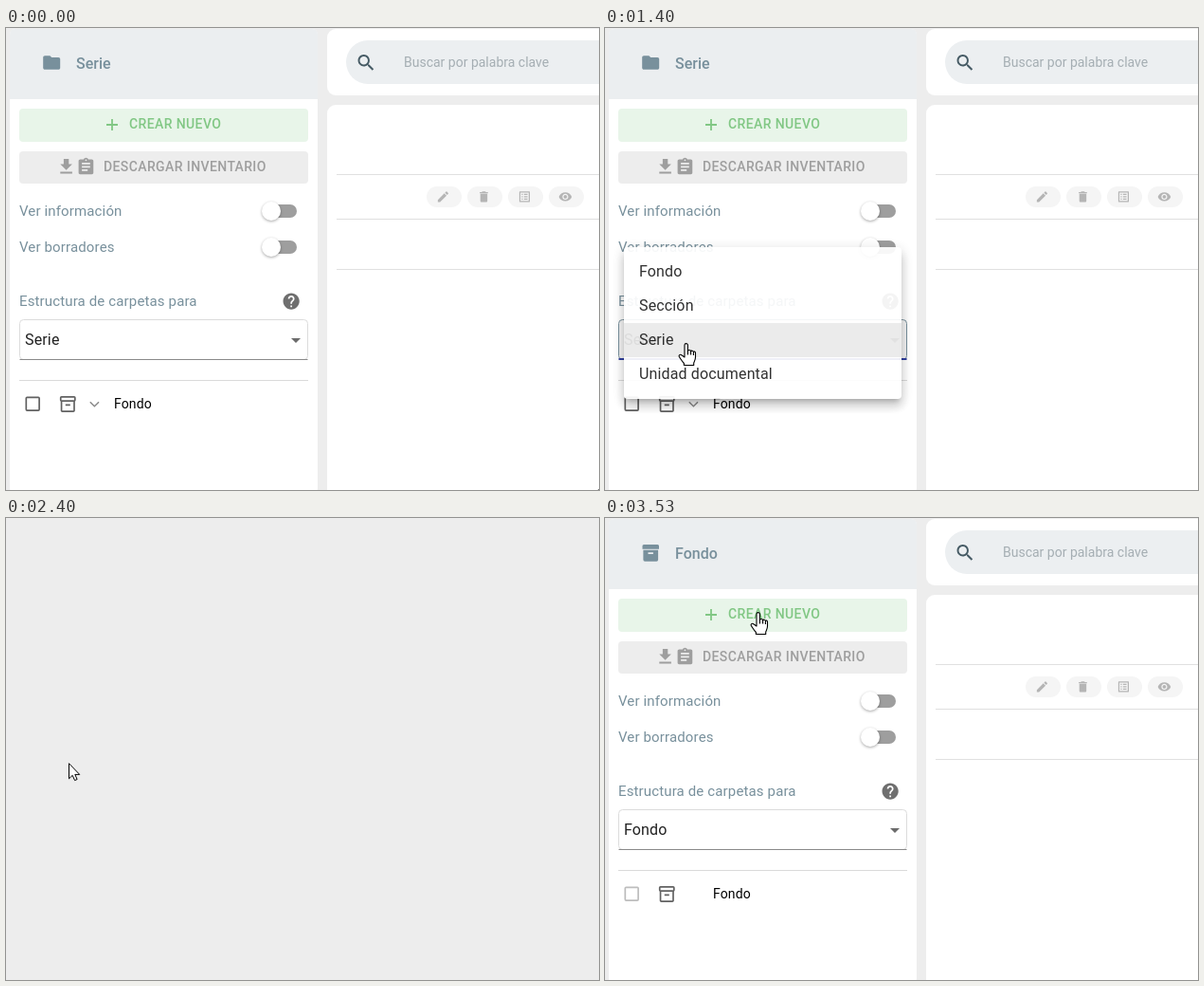
Animation of 626 by 487 pixels, one loop 6.47 s. Source, as an HTML page:

```html
<!DOCTYPE html>
<html lang="es">
<head>
<meta charset="utf-8">
<title>Estructura de carpetas</title>
<style>
  html, body { margin: 0; width: 100%; height: 100%; overflow: hidden; background: #ededed; }
  svg { position: absolute; left: 0; top: 0; }
  text, #menu { font-family: Roboto, sans-serif; }
  .slate { fill: #78909c; }
  .title { font-size: 16px; font-weight: 500; }
  .button { font-size: 14px; font-weight: 500; letter-spacing: .4px; }
  .label { font-size: 15px; letter-spacing: .14px; }
  .value { font-size: 16px; letter-spacing: .15px; fill: #212121; }
  .thumb { fill: #fff; filter: drop-shadow(0 1px 1.5px rgba(0,0,0,.35)); }
  #menu {
    position: absolute; left: 20px; top: 231px; width: 293px; padding: 8px 0;
    background: #fff; border-radius: 4px;
    box-shadow: 0 5px 5px -3px rgba(0,0,0,.2), 0 8px 10px 1px rgba(0,0,0,.14), 0 3px 14px 2px rgba(0,0,0,.12);
    font-size: 16px; letter-spacing: .15px; line-height: 36px; color: rgba(0,0,0,.87);
  }
  #menu div { height: 36px; padding-left: 16px; }
</style>
</head>
<body>
<svg id="page" width="626" height="487">
  <defs>
    <g id="switch">
      <rect x="273" y="-7" width="34" height="14" rx="7" fill="#9e9e9e"/>
      <circle class="thumb" cx="280" r="10"/>
    </g>
    <rect id="pill" y="167" width="37" height="22" rx="11" fill="#f5f5f5"/>
  </defs>

  <!-- Side panel -->
  <rect x="4" y="1" width="325" height="490" rx="6" fill="#fff"/>
  <path d="M4 75V7q0-6 6-6H323q6 0 6 6V75z" fill="#ebeef0"/>
  <path id="folder" class="slate" transform="translate(37.4 25.7) scale(.9)" d="M10 4H4c-1.1 0-2 .9-2 2v12c0 1.1.9 2 2 2h16c1.1 0 2-.9 2-2V8c0-1.1-.9-2-2-2h-8l-2-2z"/>
  <path id="box" class="slate" fill-rule="evenodd" d="M41 28H55.5q1.5 0 1.5 1.5V32.8H39.5V29.5q0-1.5 1.5-1.5zM40.4 33.8H56.1V44q0 1.7-1.7 1.7H42.1q-1.7 0-1.7-1.7zM45.5 36.3v1.7h5.4v-1.7z"/>
  <text id="title" class="title slate" x="74" y="42.5"></text>

  <rect x="14" y="85" width="305" height="35" rx="4" fill="#e8f5e9"/>
  <path d="M106 102h12M112 96v12" stroke="#81c784" stroke-width="1.8"/>
  <text class="button" x="130" y="106" fill="#81c784">CREAR NUEVO</text>

  <rect x="14" y="130" width="305" height="34" rx="4" fill="#ededed"/>
  <g fill="#9e9e9e">
    <path transform="translate(52.8 135.4) scale(.9)" d="M19 9h-4V3H9v6H5l7 7 7-7zM5 18v2h14v-2z"/>
    <path transform="translate(74 136) scale(.87)" d="M19 3h-4.18C14.4 1.84 13.3 1 12 1s-2.4.84-2.82 2H5c-1.1 0-2 .9-2 2v14c0 1.1.9 2 2 2h14c1.1 0 2-.9 2-2V5c0-1.1-.9-2-2-2zm-7 0c.55 0 1 .45 1 1s-.45 1-1 1-1-.45-1-1 .45-1 1-1zm2 14H7v-2h7v2zm3-4H7v-2h10v2zm0-4H7V7h10v2z"/>
    <text class="button" x="103" y="151">DESCARGAR INVENTARIO</text>
  </g>

  <text class="label slate" x="14" y="198">Ver información</text>
  <use href="#switch" y="193"/>
  <text class="label slate" x="14" y="236">Ver borradores</text>
  <use href="#switch" y="231"/>
  <text class="label slate" x="14" y="293">Estructura de carpetas para</text>
  <path transform="translate(290.8 277.8) scale(.86)" fill="#6f6f6f" d="M12 2C6.48 2 2 6.48 2 12s4.48 10 10 10 10-4.48 10-10S17.52 2 12 2zm1 17h-2v-2h2v2zm2.07-7.75l-.9.92C13.45 12.9 13 13.5 13 15h-2v-.5c0-1.1.45-2.1 1.17-2.83l1.24-1.26c.37-.36.59-.86.59-1.41 0-1.1-.9-2-2-2s-2 .9-2 2H8c0-2.21 1.79-4 4-4s4 1.79 4 4c0 .88-.36 1.68-.93 2.25z"/>

  <rect id="field" x="14.5" y="307.5" width="304" height="42" rx="4"/>
  <rect id="underline" x="14.5" width="304"/>
  <text id="value" class="value" x="20" y="334"></text>
  <path d="M301 327h10l-5 5z" fill="#6b6b6b"/>
  <path d="M14 371.5H319" stroke="#dadada"/>

  <g id="tree">
    <rect id="check" x="21.3" y="389.3" width="13.8" height="13.8" rx="1" fill="none" stroke-width="1.7"/>
    <path transform="translate(55.2 386.4) scale(.84)" fill="#616161" d="M20 2H4c-1 0-2 .9-2 2v3.01c0 .72.43 1.34 1 1.69V20c0 1.1 1.1 2 2 2h14c.9 0 2-.9 2-2V8.7c.57-.35 1-.97 1-1.69V4c0-1.1-1-2-2-2zm-1 18H5V9h14v11zm1-13H4V4h16v3zM9 12h6v2H9z"/>
    <path id="chevron" d="M88.8 394.2l4.6 4.6 4.6-4.6" fill="none" stroke="#8a8a8a" stroke-width="1.5"/>
    <text x="114" y="401" font-size="14" letter-spacing=".13">Fondo</text>
  </g>
  <g id="loader">
    <circle cx="150.5" cy="431.5"/><circle cx="161.5" cy="431.5"/>
    <circle cx="172.5" cy="431.5"/><circle cx="183.5" cy="431.5"/>
  </g>

  <!-- Search and table -->
  <rect x="339" y="1" width="310" height="70" rx="9" fill="#fff"/>
  <rect x="359" y="13" width="310" height="46" rx="23" fill="#eceff1"/>
  <path transform="translate(368.7 25.2) scale(.95)" fill="#455a64" d="M15.5 14h-.79l-.28-.27C15.41 12.59 16 11.11 16 9.5 16 5.91 13.09 3 9.5 3S3 5.91 3 9.5 5.91 16 9.5 16c1.61 0 3.09-.59 4.23-1.57l.27.28v.79l5 4.99L20.49 19l-4.99-5zm-6 0C7.01 14 5 11.99 5 9.5S7.01 5 9.5 5 14 7.01 14 9.5 11.99 14 9.5 14z"/>
  <text x="420" y="41" font-size="14" fill="#a5aeb3">Buscar por palabra clave</text>
  <rect x="339" y="81" width="310" height="430" rx="9" fill="#fff"/>
  <g id="table">
    <path d="M349 154.5H626M349 201.5H626M349 254.5H626" stroke="#e0e0e0"/>
    <use href="#pill" x="444"/><use href="#pill" x="487"/><use href="#pill" x="530"/><use href="#pill" x="573"/>
    <g fill="#b5b5b5">
      <path transform="translate(454 170.5) scale(.62)" d="M3 17.25V21h3.75L17.81 9.94l-3.75-3.75L3 17.25zM20.71 7.04c.39-.39.39-1.02 0-1.41l-2.34-2.34c-.39-.39-1.02-.39-1.41 0l-1.83 1.83 3.75 3.75 1.83-1.83z"/>
      <path transform="translate(497 170.5) scale(.62)" d="M6 19c0 1.1.9 2 2 2h8c1.1 0 2-.9 2-2V7H6v12zM19 4h-3.5l-1-1h-5l-1 1H5v2h14V4z"/>
      <path transform="translate(540 170.5) scale(.62)" d="M19 5v14H5V5h14m1.1-2H3.9c-.5 0-.9.4-.9.9v16.2c0 .4.4.9.9.9h16.2c.4 0 .9-.5.9-.9V3.9c0-.5-.5-.9-.9-.9zM11 7h6v2h-6zm0 4h6v2h-6zm0 4h6v2h-6zM7 7h2v2H7zm0 4h2v2H7zm0 4h2v2H7z"/>
      <path transform="translate(583 170.5) scale(.62)" d="M12 4.5C7 4.5 2.73 7.61 1 12c1.73 4.39 6 7.5 11 7.5s9.27-3.11 11-7.5c-1.73-4.39-6-7.5-11-7.5zM12 17c-2.76 0-5-2.24-5-5s2.24-5 5-5 5 2.24 5 5-2.24 5-5 5zm0-8c-1.66 0-3 1.34-3 3s1.34 3 3 3 3-1.34 3-3-1.34-3-3-3z"/>
    </g>
  </g>
</svg>

<div id="menu"><div>Fondo</div><div>Sección</div><div>Serie</div><div>Unidad documental</div></div>

<svg width="626" height="487">
  <g id="cursor" fill="#fff" stroke="#000" stroke-linejoin="round">
    <path id="arrow" stroke-linejoin="miter" d="M.5 .7V16.8l3.7-3.5 2.4 5.3 2.5-1.1-2.3-5.1h4.9z"/>
    <g id="hand" stroke-width="1.1">
      <path d="M-2 15V2.3a1.7 1.7 0 0 1 3.4 0V8.5c.5-1.6 3-1.2 3.2.4.6-1.3 2.6-.9 2.8.7.7-1 2-.6 2.1.9V15c0 3-1.2 4.5-1.8 6v2.5H-2.6V21.5C-4.5 19.5-6 17-7.6 14.6c-1-1.6.8-3 2.4-1.8z"/>
      <path d="M1.4 8.5v4M4.6 9v3.5M7.4 10v3" fill="none"/>
    </g>
  </g>
</svg>

<script>
const LOOP = 6470, FPS = 15;
const $ = id => document.getElementById(id);
const show = (id, on) => { $(id).style.display = on ? '' : 'none'; };
const set = (el, attrs) => { for (const name in attrs) el.setAttribute(name, attrs[name]); };
const clamp = v => Math.min(1, Math.max(0, v));
const smooth = v => { v = clamp(v); return v * v * (3 - 2 * v); };

// Pointer path: [tick, x, y]
const path = [
  [0, 625, 486], [2, 590, 478], [4, 488, 450], [6, 367, 416], [8, 262, 386], [10, 201, 367], [11, 190, 364],
  [12, 160, 354], [13, 120, 342], [14, 99, 335], [15, 92, 333], [17, 86, 332], [23, 86, 332],
  [28, 77, 302], [33, 67, 260], [35, 66, 258], [38, 66, 258], [40, 92, 238], [42, 142, 205],
  [45, 157, 150], [48, 162, 112], [53, 162, 99]
];
const OPEN = 19, BLANK = 36, RELOAD = 39, TREE = 45, ROWS = 50;

function pointer(tick) {
  const i = path.findIndex(p => p[0] > tick);
  if (i < 0) return path[path.length - 1].slice(1);
  const [t0, x0, y0] = path[i - 1], [t1, x1, y1] = path[i];
  const f = (tick - t0) / (t1 - t0);
  return [Math.round(x0 + (x1 - x0) * f), Math.round(y0 + (y1 - y0) * f)];
}

function draw(ms) {
  const tick = Math.floor((ms + 5) * FPS / 1000);
  const reloaded = tick >= RELOAD, open = tick >= OPEN && tick < BLANK;
  const [x, y] = pointer(tick);

  show('page', tick < BLANK || reloaded);
  show('folder', !reloaded);
  show('box', reloaded);
  $('title').textContent = $('value').textContent = reloaded ? 'Fondo' : 'Serie';
  show('tree', !reloaded || tick >= TREE);
  show('chevron', !reloaded);
  set($('check'), { stroke: reloaded ? '#bdbdbd' : '#616161' });
  show('table', !reloaded || tick >= ROWS);

  const hover = !reloaded && tick >= 13;
  set($('field'), { fill: open ? '#f4f4f4' : '#fff', stroke: open ? '#78909c' : '#dcdcdc' });
  set($('underline'), {
    y: hover ? 348 : 349, height: hover ? 2 : 1,
    fill: open ? '#303f9f' : hover ? '#212121' : '#8a8a8a'
  });

  show('loader', reloaded && tick < TREE);
  [...$('loader').children].forEach((dot, i) => {
    const gap = (((tick - 42) / 2 - i) % 4 + 4) % 4;
    const pulse = clamp(1 - Math.min(gap, 4 - gap));
    const grey = 226 - 22 * pulse;
    set(dot, { r: 2.5 + .6 * pulse, fill: `rgb(${grey},${grey},${grey})` });
  });

  const growth = (tick - OPEN + .5) / 3, scale = smooth(growth * 1.25);
  show('menu', open);
  $('menu').style.opacity = smooth(growth);
  $('menu').style.transform = `scale(${.75 + .25 * scale},${.56 + .44 * scale})`;
  const hovered = Math.floor((y - 239) / 36);
  [...$('menu').children].forEach((item, i) => {
    item.style.background = i === 2 ? '#ebebeb' : i === hovered ? '#f5f5f5' : '';
  });

  const hand = open || (tick >= 13 && tick < BLANK) || (reloaded && y < 120);
  show('hand', hand);
  show('arrow', !hand);
  set($('cursor'), { transform: `translate(${x} ${y})` });
}

const start = performance.now();
function frame() {
  draw((performance.now() - start) % LOOP);
  requestAnimationFrame(frame);
}
frame();
</script>
</body>
</html>
```
